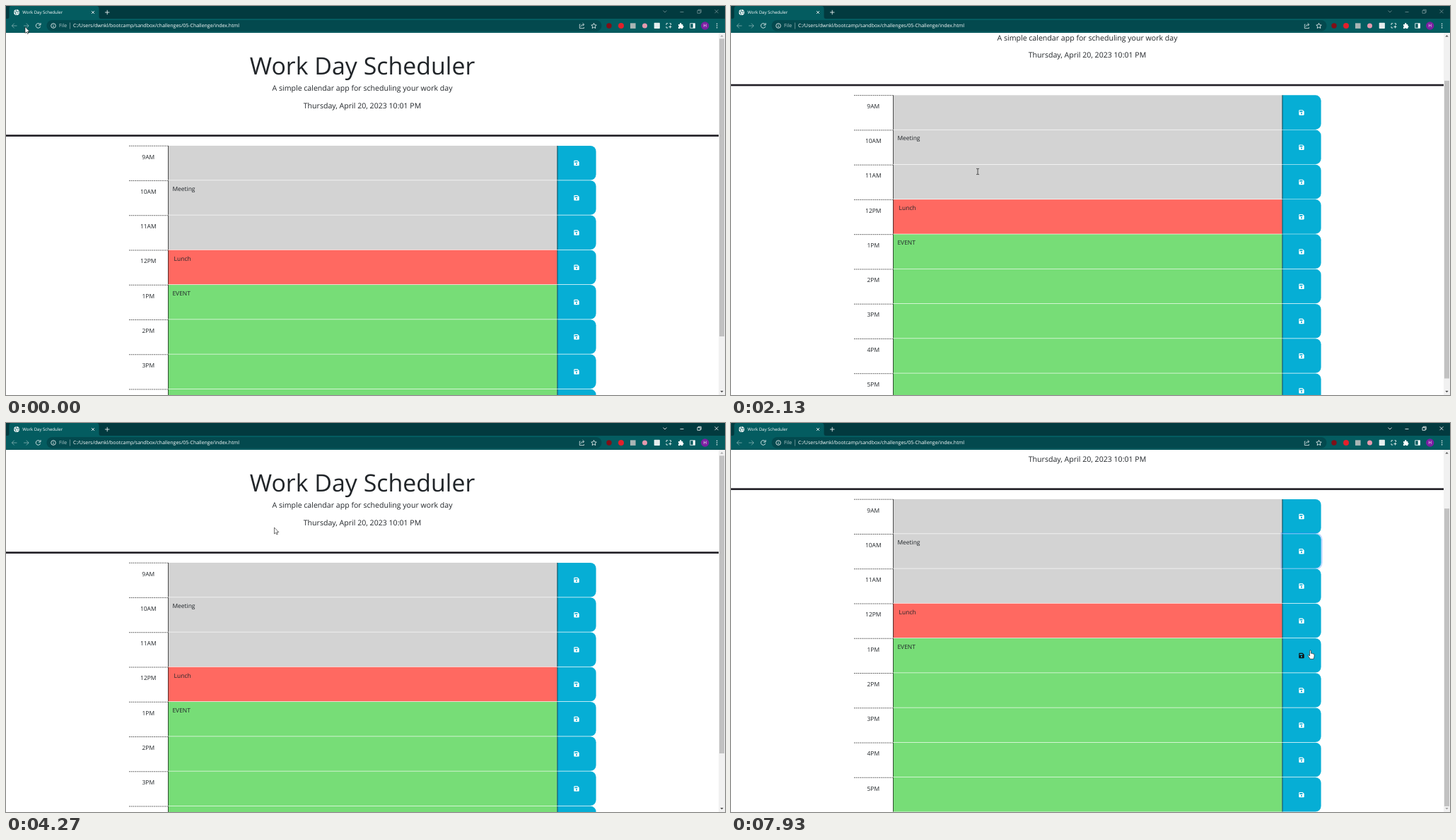
Write an HTML page that moves like this. It is 1017 px wide and 551 px high and loops after 8000 ms.

```html
<!DOCTYPE html>
<html lang="en">
<head>
<meta charset="utf-8">
<title>Work Day Scheduler</title>
<style>
  html, body { margin: 0; width: 100%; height: 100%; overflow: hidden; background: #fff; }
  svg { display: block; width: 1017px; height: 551px; font-family: "Open Sans", "Noto Sans", sans-serif; }
  text { white-space: pre; text-rendering: geometricPrecision; }
  .line { fill: none; stroke: #fff; stroke-width: .8; }
  .pointer { stroke: #111; stroke-width: .6; stroke-linejoin: round; fill: #fff; }
</style>
</head>
<body>
<svg id="stage" viewBox="0 0 1017 551">
  <defs>
    <path id="disk" fill-rule="evenodd" d="M-3.7-2.9Q-3.7-3.7-2.9-3.7H1.6L3.7-1.6V2.9Q3.7 3.7 2.9 3.7H-2.9Q-3.7 3.7-3.7 2.9ZM-2.6-2.6V-.7H1.5V-2.6ZM0 .3A1.1 1.1 0 1 0 0 2.5A1.1 1.1 0 1 0 0 .3Z"/>
  </defs>
  <g id="page"></g>

  <g id="scrollbar">
    <rect x="1008" y="37" width="9" height="514" fill="#f1f1f1"/>
    <rect id="thumb" x="1009" y="46.3" width="7" height="421.7" fill="#c1c1c1"/>
    <path id="up" d="M1010.3 43.6 1012.5 41.2 1014.7 43.6Z"/>
    <path id="down" d="M1010.3 545 1012.5 547.4 1014.7 545Z"/>
  </g>

  <g id="browser">
    <rect width="1017" height="38" fill="#023a3f"/>
    <path d="M0 18H2Q4.5 18 4.5 15V4Q4.5 0 8 0H128Q131.500 0 131.500 4V15Q131.500 18 134 18H1017V37.700H0Z" fill="#045c60"/>
    <rect x="57.500" y="20" width="785" height="15.800" rx="7.900" fill="#03494e"/>
    <circle cx="15" cy="9" r="3.900" fill="#f4f8f8"/>
    <path d="M11.500 8.300 14 9.200 13.600 11 14.700 12.500M14.600 5.300 14 7.200 16 8 18.300 7.600M16 10.200 17.800 10" fill="none" stroke="#045c60" stroke-width=".9"/>
    <text x="23.300" y="11.200" font-size="6.050" fill="#fff">Work Day Scheduler</text>
    <path class="line" d="M121 7 125 11M125 7 121 11"/>
    <g id="controls" class="line">
      <path d="M929.500 6.500 932 9 934.500 6.500M953.500 8.500H958.500M1002.500 5.200 1007.500 10.200M1007.500 5.200 1002.500 10.200"/>
      <path d="M978 6.300H982V10.300H978ZM979.200 6.300V5.200H983.200V9.200H982"/>
    </g>
    <path class="line" d="M140 9H146.400M143.200 5.800V12.200"/>
    <path class="line" opacity=".5" d="M15.500 28H8.500M11.700 24.600 8.300 28 11.700 31.400M25 28H32M28.800 24.600 32.200 28 28.800 31.400"/>
    <path class="line" stroke-width="1" d="M48.300 26A3.300 3.300 0 1 0 48.700 29M49 24V27H46"/>
    <g class="line" stroke-width=".7">
      <circle cx="67" cy="28" r="3.300"/>
      <path d="M67 27.500V30M67 25.900V26.600"/>
      <path opacity=".45" d="M90.500 23.500V32.500"/>
      <path opacity=".85" d="M812.500 26H811.300V31.500H817.500V30M812.800 29.500Q813.300 26.300 817 26.200M815.500 24.200 818 26.300 815.500 28.400"/>
      <path d="M831.500 24.400 832.600 26.800 835.200 27.100 833.300 28.900 833.800 31.500 831.500 30.200 829.200 31.500 829.700 28.900 827.800 27.100 830.400 26.800Z"/>
      <path d="M934 27V24.700H936.300M938.500 24.700H940.500V27M934 29V31H936.300M937.500 29.500H941.500M939.500 27.500V31.500"/>
      <rect x="967.800" y="24.800" width="6.800" height="6.400"/>
    </g>
    <text x="75" y="30.300" font-size="7" fill="#b5cccd">File</text>
    <text x="95" y="30.300" font-size="7" fill="#fff">C:/Users/dwnkl/bootcamp/sandbox/challenges/05-Challenge/index.html</text>
    <circle cx="853" cy="28" r="3.700" fill="#800f17"/>
    <circle cx="870" cy="28" r="4" fill="#e3202b"/>
    <rect x="883" y="24.300" width="7.600" height="7.600" fill="#a9b5b5"/>
    <circle cx="903.500" cy="28" r="3.500" fill="#e59aae"/>
    <rect x="916.700" y="23.800" width="8.200" height="8.200" rx=".8" fill="#e5eeee"/>
    <path d="M951 26H953V25.300A1.200 1.200 0 0 1 955.400 25.300V26H957.300V28A1.200 1.200 0 0 1 957.300 30.400V32H955.200A1.200 1.200 0 0 0 953 32H951V30A1.200 1.200 0 0 0 951 27.800Z" fill="#fff"/>
    <path d="M971.700 24.800H974.700V31.200H971.700Z" fill="#fff"/>
    <circle cx="988.700" cy="28" r="5.700" fill="#7b1fa2"/>
    <text x="988.700" y="30.400" font-size="6.500" fill="#fff" text-anchor="middle">H</text>
    <g fill="#fff"><circle cx="1005.600" cy="25.200" r=".8"/><circle cx="1005.600" cy="28" r=".8"/><circle cx="1005.600" cy="30.800" r=".8"/></g>
  </g>

  <g id="cursor">
    <path id="arrow" class="pointer" d="M0 0V9L2.100 7.200 3.400 10 4.800 9.400 3.500 6.600H6.300Z"/>
    <path id="beam" fill="none" stroke="#222" stroke-width=".8" d="M-1.900-4.100H-.6L0-3.600.6-4.100H1.900M0-3.600V3.600M-1.900 4.100H-.6L0 3.600.6 4.100H1.900"/>
    <path id="hand" class="pointer" d="M-1 .8C-1-.3.9-.3.9.8V4.500C1.300 3.900 2.500 4 2.600 4.900C3 4.400 4.100 4.500 4.200 5.300C4.600 4.900 5.500 5.100 5.500 6V8.500C5.500 10 4.600 10.800 4.500 12.300H-.6C-.8 10.800-2.200 9.800-3.400 7.600C-3.700 6.800-2.600 6.300-2 7L-1 8Z"/>
  </g>
</svg>
<script>
const LOOP = 8000, TICK = 1000 / 15;
const LEFT = 174, TEXT = 229, SAVE = 779.6, RIGHT = 834.6;
const TOP = 197.9, ROW = 49.26, FILL = 48.6;
const FOCUS_ROW = 1;

const $ = id => document.getElementById(id);
const hours = ['9AM', '10AM', '11AM', '12PM', '1PM', '2PM', '3PM', '4PM', '5PM'];
const notes = { 1: 'Meeting', 3: ' Lunch', 4: 'EVENT' };
const rowColor = i => i < 3 ? '#d3d3d3' : i === 3 ? '#ff6961' : '#77dd77';

const label = (x, y, size, str, anchor = 'middle') =>
  `<text x="${x}" y="${y}" font-size="${size}" fill="#212529" text-anchor="${anchor}">${str}</text>`;

// Right-hand rounded button outline, grown by g on every side
const button = (y, g = 0) => {
  const r = 8 + g;
  return `M${SAVE - g} ${y - g}H${RIGHT + g - r}a${r} ${r} 0 0 1 ${r} ${r}V${y + FILL + g - r}a${r} ${r} 0 0 1 ${-r} ${r}H${SAVE - g}Z`;
};

function row(hour, i) {
  const y = TOP + i * ROW;
  const ring = i === FOCUS_ROW ? `<path id="ring" d="${button(y, 2.1)}" fill="#0d6efd" fill-opacity=".25"/>` : '';
  return `<path d="M${LEFT} ${y + .3}H${TEXT}" stroke="#111" stroke-width=".7" stroke-dasharray="1.7 1"/>
    ${label(201.3, y + 18.6, 8.475, hour)}
    <rect x="${TEXT}" y="${y}" width="${SAVE - TEXT}" height="${FILL}" fill="${rowColor(i)}"/>
    <rect x="${TEXT}" y="${y}" width=".7" height="${FILL}" fill="#111"/>
    ${label(235.4, y + 14.9, 8.475, notes[i] || '', 'start')}
    ${ring}<path d="${button(y)}" fill="#06aed5"/>
    <rect x="${SAVE}" y="${y}" width=".7" height="${FILL}" fill="#111"/>
    <use class="icon" href="#disk" x="807" y="${y + 24.6}" fill="#fff"/>`;
}

$('page').innerHTML =
  label(504, 96.6, 33.9, 'Work Day Scheduler') +
  label(504, 120.1, 10.59, 'A simple calendar app for scheduling your work day') +
  label(504, 144.5, 10.59, 'Thursday, April 20, 2023 10:01 PM') +
  '<rect y="182.3" width="1008" height="2.65" fill="#211f26"/>' +
  hours.map(row).join('');
const icons = document.querySelectorAll('.icon');

// start, end, offset
const scrolls = [[1400, 1733, 53], [2000, 2266, 90], [2625, 2866, 0], [4620, 4981, 90]];
// start, end, control x, control y, x, y
const moves = [
  [0, 866, 140, 175, 268, 306],
  [866, 1200, 325, 270, 360.5, 255.5],
  [1400, 1733, 352, 240, 349, 234.5],
  [3266, 4066, 520, 165, 379.5, 148],
  [4600, 5133, 402, 155, 349, 183],
  [5200, 5866, 600, 185, 813, 190.5],
  [7266, 7933, 838, 255, 819.5, 322]
];

const progress = (t, a, b) => Math.min(1, Math.max(0, (t - a) / (b - a)));
const ease = p => p * p * (3 - 2 * p);

function scrollAt(t) {
  return scrolls.reduce((v, [a, b, to]) => v + (to - v) * ease(progress(t, a, b)), 0);
}

function pointerAt(t) {
  let x = 27, y = 29.5;
  for (const [a, b, cx, cy, tx, ty] of moves) {
    if (t < a) break;
    const p = ease(progress(t, a, b)), q = 1 - p;
    x = q * q * x + 2 * p * q * cx + p * p * tx;
    y = q * q * y + 2 * p * q * cy + p * p * ty;
  }
  return [x, y];
}

function draw(ms) {
  const t = Math.floor((ms % LOOP + 4) / TICK) * TICK;
  const scroll = scrollAt(t);
  const [x, y] = pointerAt(t);
  const over = y > 38 ? Math.floor((y + scroll - TOP) / ROW) : -1;
  const onSave = over >= 0 && x > SAVE && x < RIGHT;
  const onText = over >= 0 && x > TEXT && x <= SAVE;

  $('page').setAttribute('transform', `translate(0 ${-scroll})`);
  $('thumb').setAttribute('y', 46.3 + scroll * .832);
  $('up').setAttribute('fill', scroll < .5 ? '#a3a3a3' : '#505050');
  $('down').setAttribute('fill', scroll > 89.5 ? '#a3a3a3' : '#505050');
  $('ring').setAttribute('opacity', progress(t, 6133, 6266));
  $('controls').setAttribute('opacity', .45 + .55 * progress(t, 4133, 4266));
  icons.forEach((icon, i) => icon.setAttribute('fill', onSave && i === over ? '#111' : '#fff'));

  $('cursor').setAttribute('transform', `translate(${x} ${y})`);
  const shape = onSave ? 'hand' : onText ? 'beam' : 'arrow';
  for (const id of ['arrow', 'beam', 'hand']) $(id).style.display = id === shape ? '' : 'none';
}

const start = performance.now();
function loop() {
  draw(performance.now() - start);
  requestAnimationFrame(loop);
}
loop();
</script>
</body>
</html>
```
